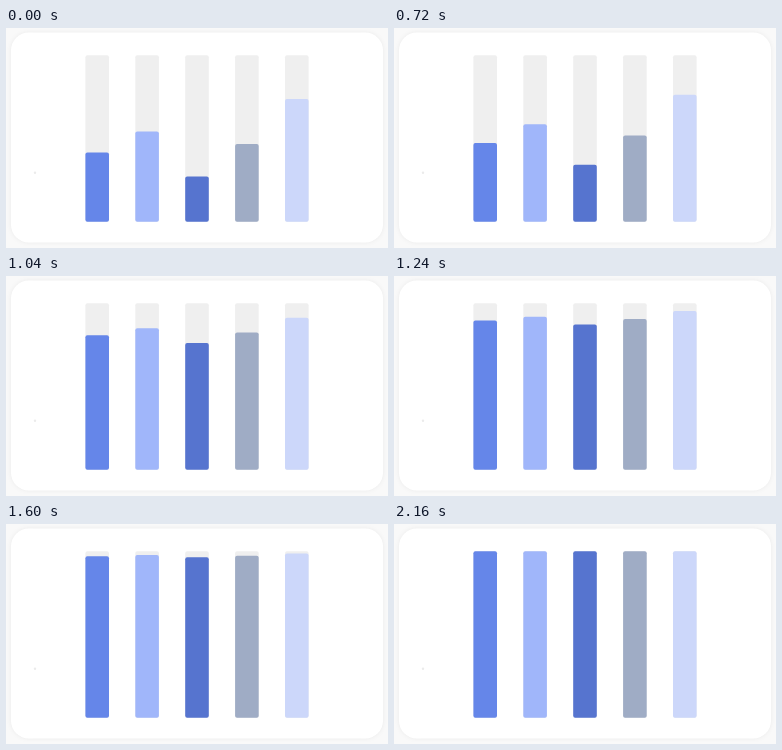
An HTML page that plays this animation: 382x220 px, repeating every 2640 ms.

```html
<!DOCTYPE html>
<html lang="en">
<head>
<meta charset="utf-8">
<title>Rising bars</title>
<style>
  html, body { margin: 0; width: 100%; height: 100%; overflow: hidden; background: #f9f9f9; }
  svg { display: block; width: 382px; height: 220px; }
  .card { fill: #fff; filter: drop-shadow(0 0 2px rgba(0, 0, 0, .06)); }
</style>
</head>
<body>
<svg viewBox="0 0 382 220">
  <rect class="card" x="5" y="4.5" width="372" height="210" rx="18"/>
  <circle cx="29" cy="144.8" r="1.2" fill="#ebebeb"/>
  <g id="chart"></g>
</svg>
<script>
const LOOP = 2640, STEP = 40, START = 500, DURATION = 1660;
const TOP = 27.3, BOTTOM = 193.8, WIDTH = 23.6;
const chart = document.getElementById('chart');

function addRect(x, fill) {
  const rect = document.createElementNS('http://www.w3.org/2000/svg', 'rect');
  const attrs = { x, y: TOP, width: WIDTH, height: BOTTOM - TOP, rx: 2, fill };
  for (const key in attrs) rect.setAttribute(key, attrs[key]);
  return chart.appendChild(rect);
}

const bars = [
  [124.4, '#6586e9'],
  [103.5, '#a0b6fa'],
  [148.4, '#5674cf'],
  [116, '#9facc5'],
  [71, '#ccd7fa']
].map(([from, fill], i) => {
  const x = 79.4 + i * 49.9;
  addRect(x, '#efefef');
  return { from, rect: addRect(x, fill) };
});

// cubic-bezier(1/3, 0, 0, 1), solved by bisection
function ease(u) {
  let lo = 0, hi = 1;
  for (let i = 0; i < 24; i++) {
    const s = (lo + hi) / 2;
    if (s * (1 - s) ** 2 + s ** 3 < u) lo = s; else hi = s;
  }
  return lo * lo * (3 - 2 * lo);
}

function draw(now) {
  const t = Math.floor(now % LOOP / STEP) * STEP;
  const p = ease(Math.min(1, Math.max(0, (t - START) / DURATION)));
  for (const { from, rect } of bars) {
    const y = from + (TOP - from) * p;
    rect.setAttribute('y', y);
    rect.setAttribute('height', BOTTOM - y);
  }
}

const origin = performance.now();
function tick() {
  draw(performance.now() - origin);
  requestAnimationFrame(tick);
}
tick();
</script>
</body>
</html>
```
